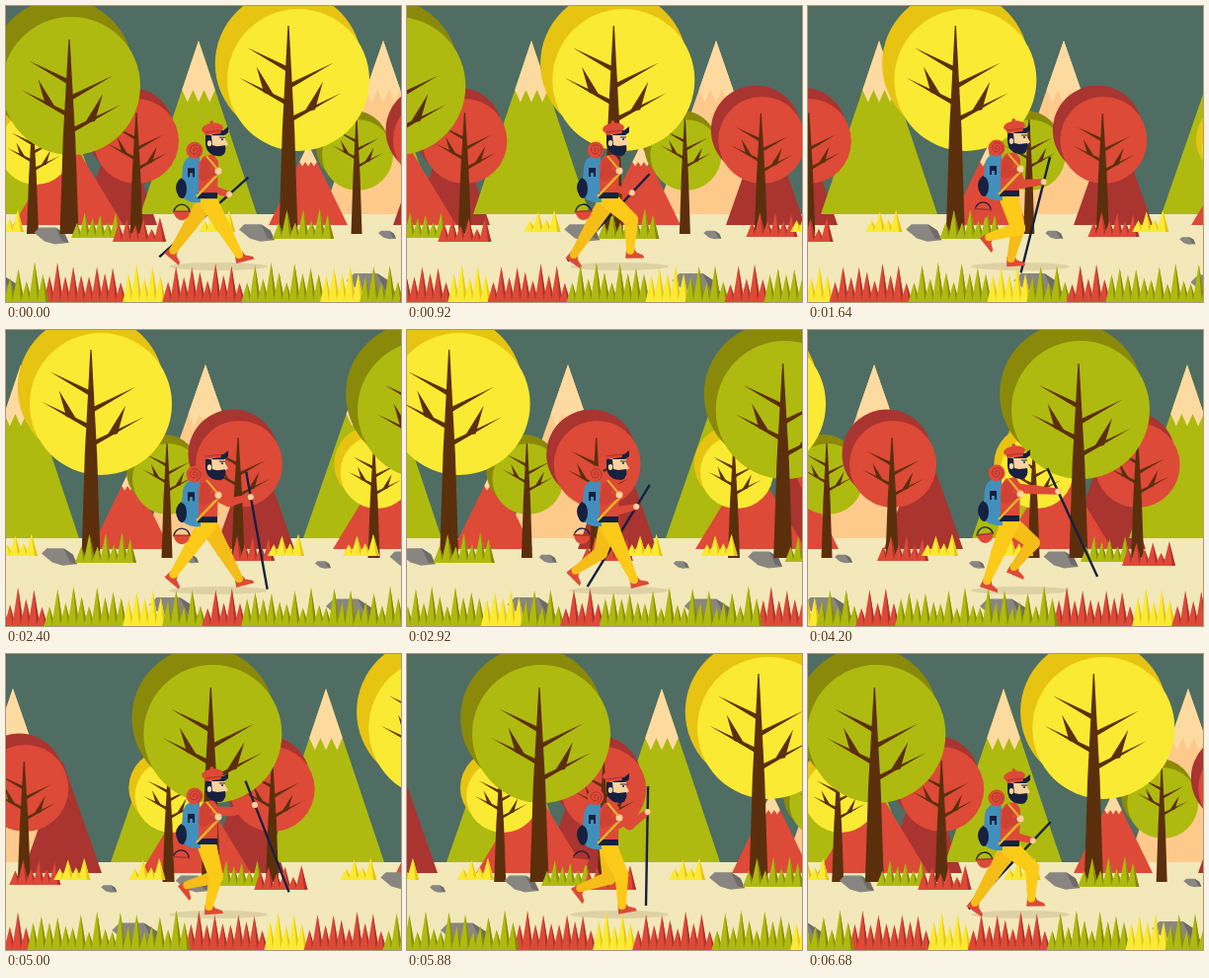
An HTML page with a canvas for the animation above (6720 ms loop, 400x300 px).

```html
<!DOCTYPE html>
<html lang="en">
<head>
<meta charset="utf-8">
<title>Forest walk</title>
<style>
html, body { margin: 0; width: 100%; height: 100%; overflow: hidden; background: #4f6d62; }
canvas { display: block; }
</style>
</head>
<body>
<canvas id="stage" width="400" height="300"></canvas>
<script>
const ctx = document.getElementById('stage').getContext('2d');
const { sin, cos, sqrt, hypot, PI } = Math;
const LOOP = 6720, STRIDE = 960, FRAME = 40;
const GREEN = ['#aeba0f', '#8a890a'], YELLOW = ['#faea33', '#e7c412'], RED = ['#dd4a37', '#a93430'];
const NAVY = '#17203f', SKIN = '#fbd3a0', SNOW = '#fddba0', BROWN = '#5c2f0c', STRAP = '#e5b52c';

function poly(color, ...p) {
  ctx.fillStyle = color;
  ctx.beginPath();
  for (let i = 0; i < p.length; i += 2) ctx.lineTo(p[i], p[i + 1]);
  ctx.fill();
}

function oval(color, x, y, rx, ry = rx, from = 0, to = 2 * PI) {
  ctx.fillStyle = color;
  ctx.beginPath();
  ctx.ellipse(x, y, rx, ry, 0, from, to);
  ctx.fill();
}

function line(color, width, ...p) {
  ctx.strokeStyle = color;
  ctx.lineWidth = width;
  ctx.beginPath();
  for (let i = 0; i < p.length; i += 2) ctx.lineTo(p[i], p[i + 1]);
  ctx.stroke();
}

function moved(x, y, angle, paint) {
  ctx.save();
  ctx.translate(x, y);
  ctx.rotate(angle);
  paint();
  ctx.restore();
}

// Paints every item of a layer that scrolls left by one period per loop.
function scroll(t, period, items) {
  for (const [x, paint, ...args] of items) {
    const at = ((x - period * t / LOOP) % period + period) % period;
    for (const left of [at, at - period]) moved(left, 0, 0, () => paint(...args));
  }
}

function mountain(color, top, half, base, snow = 0) {
  poly(color, 0, top, half, base, -half, base);
  const w = half * snow / (base - top), edge = [0, top];
  for (let i = 0; i <= 6; i++) edge.push(w * (1 - i / 3), top + snow * (i % 2 ? 1.25 : 1));
  poly(SNOW, ...edge);
}

// The crown is a disc of radius r around (lean, y) with its shaded twin up and to the left.
function tree([light, dark], r, lean, y, top, width) {
  oval(dark, lean - r * .14, y - r * .23, r * 1.03);
  oval(light, lean, y, r);
  const base = 231, w = width / 2, mid = (top + base) / 2;
  poly(BROWN, -.6, top, .6, top, w * .65, mid, w, base, -w, base, -w * .65, mid);
  const size = r / 71, thick = width * .15;
  for (let i = 0; i < 4; i++) {
    const side = i % 2 ? 1 : -1, join = top + (44 + 17 * i) * size, reach = side * (41 + 4 * i) * size;
    const tip = join - (22 + 2 * i) * size;
    poly(BROWN, reach, tip, 0, join - thick, 0, join + thick);
    if (i > 1) poly(BROWN, reach * .65, tip - 11 * size, reach * .3, join - 9 * size, reach * .5, join - 11 * size);
  }
}

function rock(y, w) {
  const h = w * .48;
  poly('#898682', -w / 2, y - h * .2, -w * .35, y - h / 2, w * .12, y - h / 2, w * .38, y - h * .15, w / 2, y + h * .42, w * .1, y + h / 2, -w * .2, y + h * .32);
  poly('#6e6b69', w * .12, y - h / 2, w * .38, y - h * .15, w / 2, y + h * .42, w * .3, y + h * .3);
}

function grass([light, dark], width, base, height) {
  const n = Math.round(width / 8), w = width / n;
  for (let i = 0; i < n; i++) {
    const x = (i + .5) * w, random = Math.abs(sin(i * 12.9 + width) * 43758) % 1;
    const top = base - height * (i % 2 ? .8 + .2 * random : .45 + .3 * random);
    poly(light, x, top, x + w * .75, base, x - w * .75, base);
    poly(dark, x, top, x + w * .75, base, x + w * .35, base);
  }
}

const HILLS = [
  [382, mountain, '#fdca8c', 35, 61, 211, 50],
  [38, mountain, GREEN[0], 35, 61, 211, 50],
  [114, mountain, RED[1], 108, 39, 222],
  [63, mountain, RED[0], 130, 56, 222],
  [195, mountain, GREEN[0], 35, 59, 211, 50],
  [432, mountain, RED[1], 108, 40, 222],
  [306, mountain, RED[0], 140, 40, 222, 18]
];
const SMALL_TREES = [
  [27, tree, YELLOW, 37, 3, 144, 117, 12],
  [355, tree, GREEN, 36, 1, 151, 115, 11],
  [132, tree, RED, 43, 0, 137, 108, 13]
];
const BIG_TREES = [
  [46, rock, 233, 35],
  [254, rock, 230, 36],
  [386, rock, 232, 18],
  [521, rock, 238, 16],
  [435, tree, RED, 44, 1, 136, 109, 13],
  [64, tree, GREEN, 70, 2, 81, 34, 19],
  [286, tree, YELLOW, 72, 10, 75, 20, 19],
  [272, grass, GREEN, 58, 236, 34],
  [68, grass, GREEN, 47, 235, 28],
  [110, grass, RED, 50, 239, 25],
  [422, grass, RED, 48, 234, 27],
  ...[197, 467, 543].map(x => [x, grass, YELLOW, 33, 229, 24])
];
// One letter is 40 px of meadow.
const MEADOW = [...'RRYRRGGYGRGGGG'].map((c, i) =>
  [40 + 40 * i, grass, { R: RED, Y: YELLOW, G: GREEN }[c], 40 + i / 9, 301, 42]);
const FRONT = [[550, rock, 285, 52], [370, rock, 283, 50], ...MEADOW];

function limb(color, x0, y0, x1, y1, w0, w1) {
  const d = hypot(x1 - x0, y1 - y0) || 1, nx = (y1 - y0) / d / 2, ny = (x0 - x1) / d / 2;
  poly(color, x0 + nx * w0, y0 + ny * w0, x1 + nx * w1, y1 + ny * w1, x1 - nx * w1, y1 - ny * w1, x0 - nx * w0, y0 - ny * w0);
  oval(color, x0, y0, w0 / 2);
  oval(color, x1, y1, w1 / 2);
}

// Two equal segments; side picks the way the joint bends.
function bent(color, x0, y0, x1, y1, length, side, [w0, w1, w2]) {
  const dx = x1 - x0, dy = y1 - y0, d = hypot(dx, dy);
  const out = side * sqrt(Math.max(0, length * length - d * d / 4)) / d;
  const jx = (x0 + x1) / 2 + dy * out, jy = (y0 + y1) / 2 - dx * out;
  limb(color, x0, y0, jx, jy, w0, w1);
  limb(color, jx, jy, x1, y1, w1, w2);
}

// The foot slides back on the ground, then lifts and accelerates forward.
function leg(time, color) {
  const phase = time % STRIDE, stance = 440;
  let x, y, angle;
  if (phase < stance) {
    const p = phase / stance;
    x = 236 - 67 * p;
    y = 252 + 4 * sin(PI * p);
    angle = -.25 + .85 * p * p;
  } else {
    const p = (phase - stance) / (STRIDE - stance);
    x = 169 + 67 * p * p;
    y = 252 - 18 * sin(PI * p);
    angle = .6 - .85 * p + .7 * sin(PI * p);
  }
  moved(x, y, angle, () => poly(RED[0], -4, -2, 4, -2, 6, 2, 13, 5, 14, 8, -5, 8));
  bent(color, 204, 196, x, y, 31, 1, [19, 14, 8]);
}

// The stick swings forward fast and is dragged back slowly.
function stickArm(time, bob) {
  const swing = 300, forward = time < swing;
  const s = forward ? sin(PI / 2 * time / swing) : (STRIDE - time) / (STRIDE - swing);
  const x = 226 + 30 * s, y = 191 - 30 * s - (forward ? 14 * sin(PI * time / swing) : 0);
  moved(x, y, .84 - 1.4 * s, () => line(NAVY, 2.4, 0, -26, 0, 95));
  bent(RED[0], 207, 160 + bob, x, y, 23, -1, [10, 9, 6]);
  oval(SKIN, x, y, 3);
}

function pot(time) {
  moved(178, 196, .12 * sin(time / STRIDE * 4 * PI), () => {
    ctx.strokeStyle = NAVY;
    ctx.lineWidth = 1.3;
    ctx.beginPath();
    ctx.arc(0, 12, 8, PI, 0);
    ctx.stroke();
    oval(RED[0], 0, 11, 8, 9, 0, PI);
    line(RED[1], 1.5, -9, 11, 9, 11);
  });
}

function backpack() {
  oval(NAVY, 182, 183, 10, 11, PI / 2, PI * 1.5);
  ctx.fillStyle = '#438fbc';
  ctx.beginPath();
  ctx.moveTo(196, 150);
  ctx.quadraticCurveTo(181, 149, 179, 162);
  ctx.lineTo(177, 186);
  ctx.quadraticCurveTo(178, 199, 197, 198);
  ctx.fill();
  oval(NAVY, 178, 184, 5, 10);
  poly(NAVY, 184, 163, 191, 163, 191, 172, 189, 172, 189, 168, 186, 168, 186, 172, 184, 172);
  oval(RED[0], 191, 145, 8.5);
  const spiral = [];
  for (let a = 0; a < 14; a += .3) spiral.push(191 + cos(a) * a * .48, 145 + sin(a) * a * .48);
  line(RED[1], 1, ...spiral);
}

function head() {
  poly(SKIN, 205, 128, 222, 128, 222, 134, 225, 139, 222, 141, 222, 148, 206, 148);
  ctx.fillStyle = NAVY;
  ctx.beginPath();
  for (const p of [[202, 129], [208, 130], [209, 140], [214, 141], [222, 140]]) ctx.lineTo(...p);
  ctx.quadraticCurveTo(224, 149, 217, 151);
  ctx.quadraticCurveTo(203, 151, 202, 138);
  ctx.fill();
  poly(NAVY, 208, 130, 213, 124, 220, 125, 225, 121, 225, 127, 221, 130);
  oval(SKIN, 206, 138, 2.2, 3);
  oval(NAVY, 219, 134, 1);
  line(NAVY, 1, 216, 132, 222, 132);
  moved(209, 123, -.12, () => {
    oval(RED[0], 0, 0, 11, 5.5);
    oval(RED[0], 0, -6, 2);
    poly(RED[0], -9, 0, 9, 0, 8, 6, -8, 6);
    line(RED[1], 1, -8, 3, 8, 3);
  });
}

function torso() {
  poly(RED[0], 200, 151, 210, 149, 215, 156, 214, 190, 195, 190, 195, 158);
  poly(NAVY, 194, 188, 214, 188, 214, 194, 194, 194);
  line(STRAP, 2.5, 216, 168, 193, 192);
  bent('#cf4233', 203, 158, 213, 167, 14, -1, [11, 9, 6]);
  oval(SKIN, 215, 166, 3.5);
  line(STRAP, 2, 203, 151, 214, 164);
}

function hiker(time) {
  const bob = 1.2 * cos(time / STRIDE * 4 * PI);
  oval('#ded2a5', 215, 264, 50, 4);
  stickArm(time, bob);
  leg(time + STRIDE / 2, '#f5bd18');
  leg(time, '#fcca18');
  moved(0, bob, 0, () => {
    pot(time);
    backpack();
    torso();
    head();
  });
}

function draw(t) {
  ctx.fillStyle = '#4f6d62';
  ctx.fillRect(0, 0, 400, 300);
  ctx.fillStyle = '#f2e8ba';
  ctx.fillRect(0, 211, 400, 89);
  scroll(t, 504, HILLS);
  scroll(t, 537.6, SMALL_TREES);
  scroll(t, 560, BIG_TREES);
  hiker(t % STRIDE);
  scroll(t, 560, FRONT);
}

const start = performance.now();
function tick() {
  const t = (performance.now() - start) % LOOP;
  draw(Math.floor(t / FRAME) * FRAME);
  requestAnimationFrame(tick);
}
tick();
</script>
</body>
</html>
```
